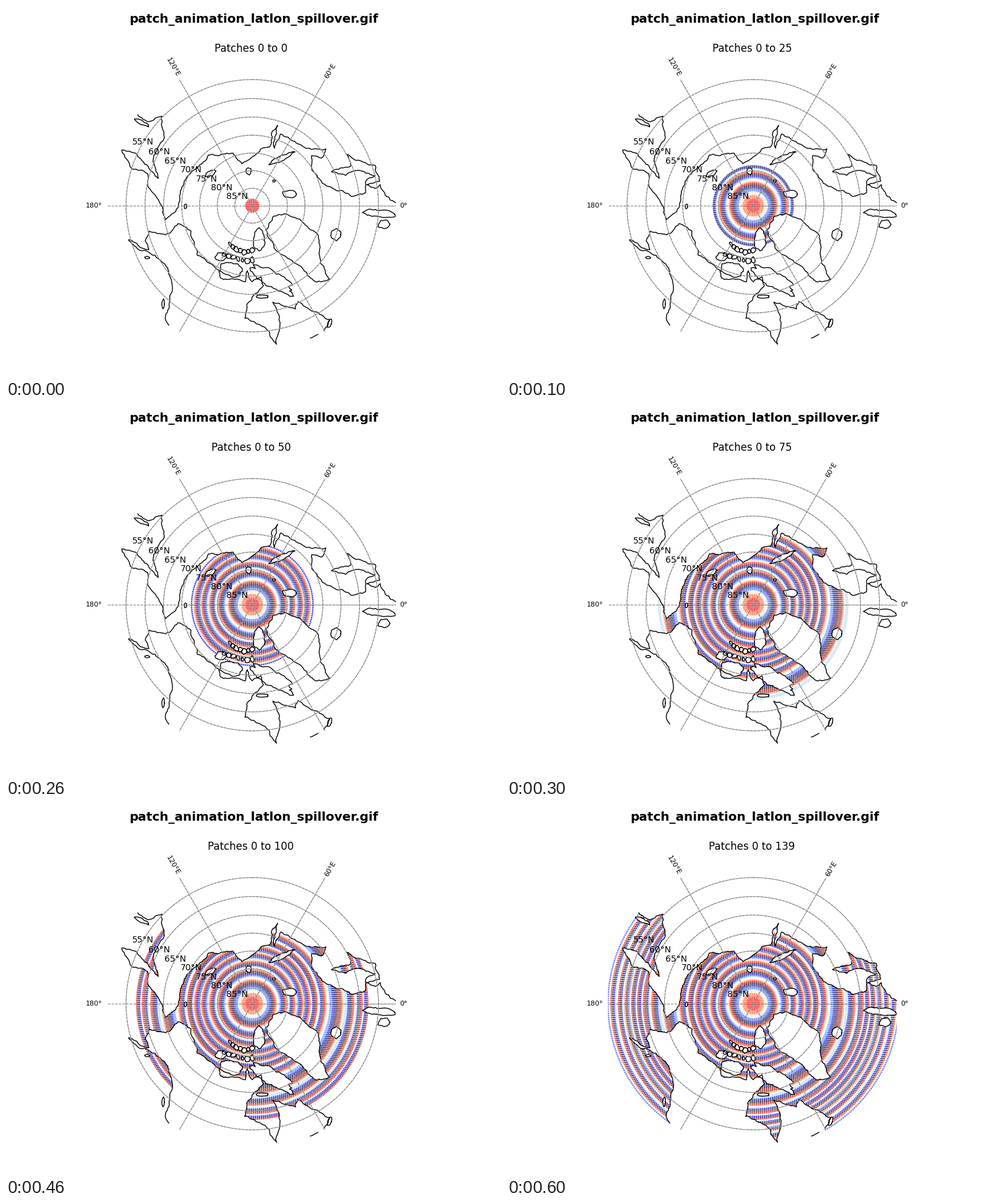
A matplotlib script for the animation above (0.7 s loop, 800 by 600 pixels).

```python
import numpy as np
import matplotlib.pyplot as plt
from matplotlib.animation import FuncAnimation
from matplotlib.patches import Circle, Rectangle
from matplotlib.path import Path

CX, CY, SCALE = 398, 323, 647      # pole position and stereographic scale
RIM = SCALE * np.tan(np.radians(20))
NSIDE = 128                        # equal-area grid resolution
PATCHES = 140
STEP = 25
FRAMES = 7

plt.rcParams["font.family"] = "DejaVu Sans"
fig = plt.figure(figsize=(8, 6), dpi=100, facecolor="white")
ax = fig.add_axes([0, 0, 1, 1])
ax.set_xlim(0, 800)
ax.set_ylim(600, 0)
ax.axis("off")
window = Rectangle((162.5, 85), 467, 470, transform=ax.transData)
rng = np.random.default_rng(4)
lands = []


def polar(r, lon):
    a = np.radians(lon)
    return CX + r * np.cos(a), CY - r * np.sin(a)


def radius(lat):
    return SCALE * np.tan(np.radians(90 - lat) / 2)


def fractal(p, q):
    """Points from p up to q, by random midpoint displacement."""
    d = q - p
    length = np.hypot(*d)
    if length < 5:
        return [p]
    push = rng.uniform(-1, 1) * min(2, 0.16 * length) / length
    mid = (p + q) / 2 + push * np.array([-d[1], d[0]])
    return fractal(p, mid) + fractal(mid, q)


def coast(*keys):
    keys = np.array(keys, float)
    pts = [s for p, q in zip(keys[:-1], keys[1:]) for s in fractal(p, q)]
    pts.append(keys[-1])
    x, y = np.array(pts).T
    line, = ax.plot(x, y, color="black", lw=1, zorder=3,
                    solid_joinstyle="round")
    line.set_clip_path(window)
    return pts


def island(x, y, rx, ry, tilt=0):
    """Ragged ellipse; the tilt in degrees turns it clockwise."""
    n = int(7 + (rx + ry) / 3)
    a = np.arange(n) * 2 * np.pi / n
    wave = rng.uniform(0.8, 1.15, n)
    u, v = rx * wave * np.cos(a), ry * wave * np.sin(a)
    c, s = np.cos(np.radians(tilt)), np.sin(np.radians(tilt))
    keys = np.column_stack([x + u * c - v * s, y + u * s + v * c])
    lands.append(coast(*keys, keys[0]))


# Eurasia: Okhotsk to the Bering Strait, Arctic shore, Norway to the Channel
eurasia = coast(
    (213, 176), (231, 187), (252, 178), (256, 213), (238, 247), (246, 279),
    (212, 240), (187, 233), (203, 263), (229, 271), (230, 293), (250, 321),
    (257, 346), (278, 326), (288, 283), (319, 252), (327, 241), (367, 238),
    (381, 255), (412, 231), (426, 228), (429, 206), (439, 193), (434, 230),
    (444, 207), (490, 230), (517, 231), (510, 246), (494, 242), (497, 268),
    (518, 291), (559, 308), (581, 302), (581, 285), (597, 274), (566, 266),
    (549, 274), (526, 268), (557, 259), (550, 240), (572, 250), (597, 258),
    (604, 283), (583, 289), (597, 295), (605, 289), (613, 306), (632, 320))
lands.append(eurasia + [(680, 0), (150, 0)])

# North America: Pacific shore, Arctic shore, Hudson Bay to Labrador
america = coast(
    (263, 516), (258, 508), (269, 457), (258, 420), (241, 403), (213, 393),
    (198, 378), (231, 394), (225, 380), (231, 364), (258, 370), (278, 352),
    (299, 364), (309, 403), (344, 427), (347, 440), (387, 446), (390, 428),
    (398, 446), (412, 438), (416, 452), (389, 484), (386, 505), (425, 526),
    (437, 547), (443, 512), (431, 479), (468, 490), (472, 478), (523, 507),
    (514, 525))
lands.append(america + [(505, 620), (263, 620)])

# Greenland
lands.append(coast(
    (420, 362), (432, 340), (450, 336), (481, 351), (505, 372), (508, 415),
    (523, 442), (500, 446), (471, 418), (436, 395), (420, 362)))

# Atlantic and Siberian islands
island(533, 370, 9, 9)
island(606, 336, 27, 6, 4)
island(611, 353, 10, 7)
island(445, 246, 21, 4, -25)
island(458, 304, 11, 6)
island(433, 283, 2, 2)
island(392, 267, 4, 6)
island(330, 271, 9, 4, -25)
island(290, 324, 2, 4)
# Pacific islands
island(220, 189, 13, 3, 25)
island(228, 407, 4, 2)
island(254, 482, 2, 8)
# Canadian islands, then the small ones strung between them
island(409, 379, 10, 18)
island(364, 426, 20, 11, 10)
island(347, 406, 9, 7)
island(431, 443, 39, 13, 33)
island(414, 470, 10, 3)
island(523, 513, 3, 8, 20)
for lon in range(240, 272, 5):
    for r in (74, 89):
        x, y = polar(r + rng.uniform(-3, 3), lon)
        island(x, y, rng.uniform(3, 5), rng.uniform(2, 5), lon)
coast((492, 537), (504, 531))


def ocean_points():
    """Polar-cap rings of an equal-area grid, without the land, pole first."""
    radii, lons = [], []
    for i in range(1, 108):
        r = SCALE * np.tan(np.arccos(1 - i * i / (3 * NSIDE ** 2)) / 2)
        radii.append(np.full(4 * i, r))
        lons.append((np.arange(4 * i) + 0.5) * 90 / i)
    r, lon = np.concatenate(radii), np.concatenate(lons)
    xy = np.column_stack(polar(r, lon))
    sea = r < RIM
    for pts in lands:
        sea &= ~Path(pts).contains_points(xy)
    return xy[sea], r[sea]


xy, dist = ocean_points()
# outer radius reached once a given number of patches is laid
reach = [0, 10.6, 66, 99, 153, 187, 219, RIM + 1]
laid = [0, 1, 26, 51, 76, 100, 126, PATCHES]
ring_start = np.searchsorted(dist, dist)
patch = np.interp(ring_start, np.searchsorted(dist, reach), laid).astype(int)
colors = plt.get_cmap("flag")(patch / PATCHES)
colors[:, :3] = 0.3 + 0.7 * colors[:, :3]

dots = ax.scatter(xy[:, 0], xy[:, 1], s=4, c=colors, linewidths=0, zorder=2)
dots.set_clip_path(window)


def grid_style(ls):
    return dict(ls=ls, lw=0.8, color="#b4b4b4" if ls == "-" else "#808080",
                zorder=4)


for ls in ("-", "--"):
    for lat in range(55, 90, 5):
        ax.add_patch(Circle((CX, CY), radius(lat), fill=False, **grid_style(ls)))
for lon in range(0, 360, 60):
    x, y = polar(RIM, lon)
    for ls in ("--",) if lon == 180 else ("-", "--"):
        line, = ax.plot([CX, x], [CY, y], **grid_style(ls))
        line.set_clip_path(window)


def label(x, y, text, size, ha="center", va="center", **kw):
    return ax.text(x, y, text, fontsize=size, ha=ha, va=va, zorder=5, **kw)


for lat in range(55, 90, 5):
    x, y = polar(radius(lat), 150)
    label(x, y - 0.7, f"{lat}°N", 10)
label(155.5, 323, "180°", 8, ha="right")
label(636.5, 323, "0°", 8, ha="left")
label(270, 99, "120°E", 8, rotation=-60)
label(524, 105, "60°E", 8, rotation=60)
label(400.5, 27, "patch_animation_latlon_spillover.gif", 14.4,
      va="baseline", weight="bold")
caption = label(396, 74, "", 12, va="baseline")


def update(k):
    last = min(k * STEP, PATCHES - 1)
    n = np.searchsorted(patch, last, side="right")
    dots.set_offsets(xy[:n])
    dots.set_facecolors(colors[:n])
    caption.set_text(f"Patches 0 to {last}")
    return dots, caption


anim = FuncAnimation(fig, update, frames=FRAMES, interval=100,
                     repeat=True, repeat_delay=0)
plt.show()
```
